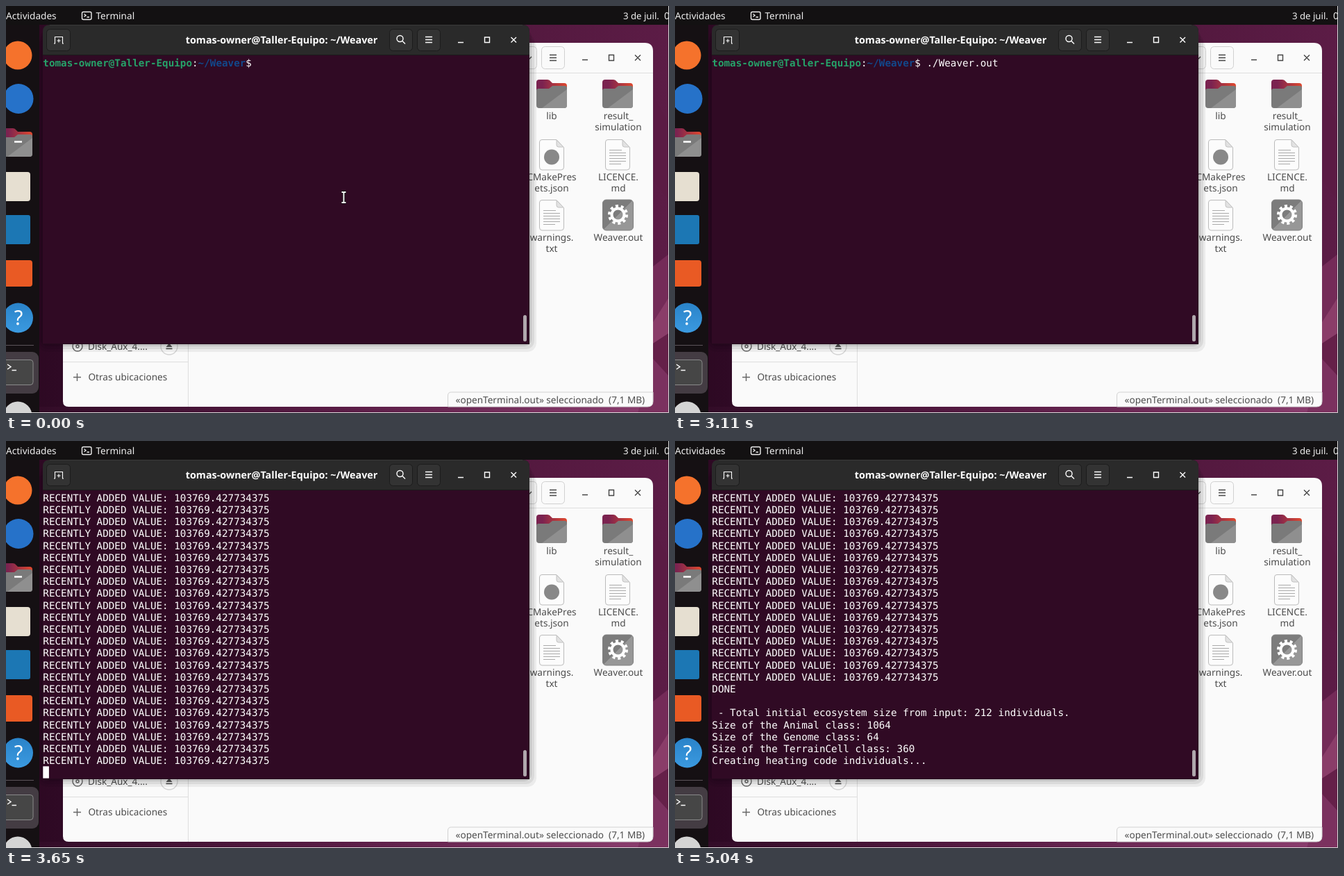
Animation, 955 px wide and 586 px high, one loop 5.41 s. Source, as an HTML page:

```html
<!DOCTYPE html>
<html lang="es">
<head>
<meta charset="utf-8">
<title>Terminal</title>
<style>
html, body { margin: 0; width: 100%; height: 100%; overflow: hidden; background: #300a24; }
svg { display: block; }
text { font: 13.6px "Noto Sans", sans-serif; text-rendering: geometricPrecision; white-space: pre; }
.mid { text-anchor: middle; }
.files text { fill: #4c4c4c; }
.title { font-weight: 700; font-size: 14.35px; fill: #fff; }
.mono, .mono text { font: 14.27px "DejaVu Sans Mono", monospace; fill: #fff; }
.mono .user { font-weight: 700; fill: #26a269; }
.mono .path { font-weight: 700; fill: #12488b; }
.line { fill: none; stroke-width: 1.4; }
</style>
</head>
<body>
<svg width="955" height="586" viewBox="0 0 955 586">
  <defs>
    <linearGradient id="wall">
      <stop offset="0" stop-color="#2b0820"/><stop offset=".1" stop-color="#300a26"/>
      <stop offset=".6" stop-color="#4d1639"/><stop offset="1" stop-color="#5c1c46"/>
    </linearGradient>
    <linearGradient id="floor">
      <stop offset="0" stop-color="#2e0a24"/><stop offset=".5" stop-color="#591c45"/>
      <stop offset="1" stop-color="#8d3f70"/>
    </linearGradient>
    <linearGradient id="back"><stop offset=".2" stop-color="#7b2350"/><stop offset="1" stop-color="#e0492f"/></linearGradient>
    <linearGradient id="gray" x1="0" y1="0" x2="1" y2="1">
      <stop offset=".5" stop-color="#7c7c7c"/><stop offset=".5" stop-color="#979797"/>
    </linearGradient>
    <linearGradient id="help" x1="0" y1="0" x2="0" y2="1"><stop offset="0" stop-color="#2a83c9"/><stop offset="1" stop-color="#3b9ae0"/></linearGradient>
    <symbol id="folder" overflow="visible">
      <path d="M0 36V4q0-4 4-4h12q3 0 5 3l2 2h17q4 0 4 4v27z" fill="url(#back)"/>
      <path d="M0 16q0-3 3-3h15l5-4h18q3 0 3 3v25q0 4-4 4H4q-4 0-4-4z" fill="#7a7a7a"/>
      <path d="M44 14v23q0 4-4 4H8z" fill="#8f8f8f"/>
    </symbol>
    <symbol id="page" overflow="visible">
      <path d="M4 .5h21l10.500 11V40q0 4-4 4H4q-3.500 0-3.500-4V4q0-3.500 3.500-3.500z" fill="#fcfcfc" stroke="#bbb"/>
      <path d="M25 1v7q0 3 3 3h7z" fill="#e2e2e2" stroke="#c2c2c2"/>
    </symbol>
    <symbol id="rules" overflow="visible">
      <path d="M6 15.500h18M6 19.500h24M6 23.500h24M6 27.500h24M6 31.500h24M6 35.500h17" stroke="#aaa"/>
    </symbol>
  </defs>

  <rect width="955" height="586" fill="url(#wall)"/>
  <rect y="577" width="955" height="9" fill="url(#floor)"/>
  <path d="M932 130l23 40v110l-23-30z" fill="#5b1b44"/>
  <path d="M932 375l23-18v62l-23 36z" fill="#742b58"/>
  <path d="M932 455l23-36v52l-23 15z" fill="#8a3d69"/>
  <path d="M932 486l23-15v62l-23-25z" fill="#652049"/>
  <path d="M932 508l23 25v53h-45z" fill="#7b315f"/>

  <!-- file manager -->
  <g class="files">
    <path d="M82 65q0-12 12-12h826q12 0 12 12v504q0 8-8 8H90q-8 0-8-8z" fill="#fafafa"/>
    <path d="M82 96.500h850M82 512.500h180M262.500 97v480" stroke="#dedede"/>
    <g fill="#fafafa" stroke="#d0d0d0">
      <rect x="730.500" y="58.500" width="34" height="32" rx="5"/>
      <rect x="771.500" y="58.500" width="33" height="32" rx="5"/>
    </g>
    <path class="line" stroke="#444" d="M751 73l3 3 3-3M783 70.500h10M783 74.500h10M783 78.500h10M830 77.500h8M868.500 70.500h7v8h-7zM906 70.500l8 8M914 70.500l-8 8"/>
    <use href="#folder" x="764" y="106"/>
    <use href="#folder" x="859" y="106"/>
    <use href="#page" x="768" y="192"/>
    <circle cx="786" cy="217.500" r="11" fill="#888"/>
    <use href="#page" x="863" y="192"/><use href="#rules" x="863" y="192"/>
    <use href="#page" x="768" y="279"/><use href="#rules" x="768" y="279"/>
    <rect x="859.500" y="279" width="44" height="44" rx="5" fill="url(#gray)" stroke="#808080"/>
    <circle cx="881.500" cy="300.500" r="9" fill="none" stroke="#fff" stroke-width="4"/>
    <circle cx="881.500" cy="300.500" r="12.500" fill="none" stroke="#fff" stroke-width="4" stroke-dasharray="4 3.854"/>
    <g class="mid">
      <text x="786" y="163">lib</text>
      <text x="882" y="163">result_</text><text x="882" y="179">simulation</text>
      <text x="786" y="251">CMakePres</text><text x="786" y="267">ets.json</text>
      <text x="882" y="251">LICENCE.</text><text x="882" y="267">md</text>
      <text x="786" y="338">warnings.</text><text x="786" y="354">txt</text>
      <text x="882" y="338">Weaver.out</text>
    </g>
    <g class="line" stroke="#666">
      <circle cx="103" cy="490" r="7"/><circle cx="103" cy="490" r="2"/>
      <circle cx="235" cy="490" r="12" stroke="#d4d4d4"/>
      <path d="M97 534.500h11M102.500 529v11"/>
    </g>
    <path d="M235 485.500l4.500 5.500h-9zM230.500 492.500h9v1.700h-9z" fill="#555"/>
    <text x="118" y="494.500">Disk_Aux_4....</text>
    <text x="118.500" y="539">Otras ubicaciones</text>
    <path d="M636.500 577v-16q0-5 5-5H932v13q0 8-8 8z" fill="#fafafa" stroke="#d2d2d2"/>
    <text x="647.500" y="571.500">«openTerminal.out» seleccionado<tspan dx="7">(7,1 MB)</tspan></text>
  </g>

  <!-- terminal shadow, in bands -->
  <g fill="#000">
    <rect x="46" y="46" width="718" height="452" rx="13" fill-opacity=".06"/>
    <rect x="48" y="40" width="713" height="454" rx="12" fill-opacity=".07"/>
    <rect x="50" y="34" width="707" height="456" rx="10" fill-opacity=".1"/>
  </g>

  <!-- dock and top bar -->
  <rect y="27" width="48" height="559" fill="#151013"/>
  <circle cx="17" cy="71" r="20.500" fill="#f5722c"/>
  <circle cx="18" cy="133.500" r="21.500" fill="#2672c9"/>
  <use href="#folder" x="-6" y="176"/>
  <path d="M12 195.500h11" stroke="#fff" stroke-width="2.500"/>
  <rect x="-7" y="239" width="42" height="42" rx="4" fill="#e6dfd1"/>
  <rect x="-7" y="301" width="42" height="42" rx="3" fill="#1c77b4"/>
  <rect x="-4" y="366" width="42" height="38" rx="4" fill="#e95a24"/>
  <circle cx="17.500" cy="449" r="21.500" fill="url(#help)"/>
  <text class="mid" x="18" y="459" style="font-size:29px" fill="#fff">?</text>
  <path d="M0 488.500h40" stroke="#5c535a"/>
  <rect x="-9" y="498" width="56" height="60" rx="9" fill="#443c43"/>
  <rect x="-5" y="509.500" width="44" height="36" rx="4" fill="#464646" stroke="#8a8a8a"/>
  <path class="line" d="M2 516l5 3.500-5 3.500M8.500 524.500h6.500" stroke="#fff"/>
  <circle cx="17" cy="590" r="20.500" fill="#d4d4d4"/>
  <rect width="955" height="27" fill="#131112"/>
  <g fill="#eee">
    <text x="0" y="18.800">Actividades</text>
    <text x="129.500" y="18.800">Terminal</text>
    <text x="889" y="18.800" style="font-size:13.200px">3 de juil.</text>
    <text x="948" y="18.800">09:41</text>
  </g>
  <g class="line" stroke="#eee">
    <rect x="109.500" y="8.500" width="13.500" height="11" rx="2"/>
    <path d="M112.500 11.500l2.500 2-2.500 2M116.500 16h3.500"/>
  </g>

  <!-- terminal -->
  <path d="M53 37q0-10 10-10h681q10 0 10 10v450H53z" fill="#300a24"/>
  <path d="M53 70V37q0-10 10-10h681q10 0 10 10v33z" fill="#2a2a2a"/>
  <path d="M53 70.500h701" stroke="#1b1b1b"/>
  <path d="M63 27.500h681" stroke="#3b3b3b"/>
  <path d="M753.500 70v417M53 486.500h701" stroke="#250a1d"/>
  <g fill="#333" stroke="#1c1c1c">
    <rect x="58.500" y="33.500" width="34" height="31" rx="5"/>
    <rect x="552.500" y="33.500" width="33" height="31" rx="5"/>
    <rect x="592.500" y="33.500" width="33" height="31" rx="5"/>
  </g>
  <g class="line" stroke="#fff">
    <path d="M69 54h1.500v-9.500h11V54H83M76 47.500v5M73.500 50h5" stroke-width="1.100"/>
    <circle cx="567.500" cy="47" r="4.500"/>
    <path d="M571 50.500l4 4M604 44.500h10M604 48.500h10M604 52.500h10M651 52.500h8M689.500 45h7v7.500h-7zM727.500 45l7.500 7.500M735 45l-7.500 7.500"/>
  </g>
  <text class="title mid" x="397" y="53.500">tomas-owner@Taller-Equipo: ~/Weaver</text>
  <rect x="745" y="445" width="5" height="38" rx="2.500" fill="#b0a8ad"/>
  <g class="mono">
    <text id="prompt" x="53.300" y="86.900"><tspan class="user">tomas-owner@Taller-Equipo</tspan>:<tspan class="path">~/Weaver</tspan>$</text>
    <g id="rows"></g>
    <rect id="caret" width="8.600" height="17.200" fill="#fff"/>
  </g>

  <g id="beam">
    <path d="M-3.500-7.500h2.500l1 1 1-1h2.500M0-6.500v13M-3.500 7.500h2.500l1-1 1 1h2.500" fill="none" stroke="#111" stroke-width="3.600"/>
    <path d="M-3-7.500h2l1 1 1-1h2M0-6.500v13M-3 7.500h2l1-1 1 1h2" fill="none" stroke="#fff" stroke-width="1.800"/>
  </g>
  <path id="arrow" d="M0 0v15l3.500-3 2.500 5.500 2.500-1-2.500-5.500h5z" fill="#111" stroke="#fff"/>
  <path d="M954.500 0v585.500H0" fill="none" stroke="#d8d8d8"/>
</svg>
<script>
const LOOP = 5410, ROW = 17.19, COL = 8.59, LEFT = 53.3, TOP = 73;
const $ = id => document.getElementById(id);
const pad = ' '.repeat(36), bar = '='.repeat(47), command = './Weaver.out ';

const startup = [
  pad + command,
  bar, 'Reading configuration and initializing world...', bar,
  '',
  'Reading all resource species from JSON files ...',
  ' - Resource scientific name: alternative',
  '',
  ' - Resource scientific name: ferns',
  '',
  'Reading all animal species from JSON files ...',
  "[WARNING] Item 'instarFirstReproduction' is not being used because 'indeterminat",
  "eGrowth' is disabled",
  "[WARNING] Item 'defaultOntogeneticValue.preference' is not being used because 'g",
  "lobalPreference' is defined",
  ' - Animal scientific name: Edmontosaurus_sp',
  'numberOfInstars: 20',
  ''
];
const values = n => Array(n).fill('RECENTLY ADDED VALUE: 103769.427734375');
const summary = [
  ...values(16),
  'DONE', '',
  ' - Total initial ecosystem size from input: 212 individuals.',
  'Size of the Animal class: 1064',
  'Size of the Genome class: 64',
  'Size of the TerrainCell class: 360',
  'Creating heating code individuals...',
  ''
];
const typed = n => [pad + command.slice(0, n)];
const begun = n => [...startup.slice(0, n), ''];

// start time, lines on screen, caret shown
const scenes = [
  [0, typed(0), 0], [430, typed(0), 1], [1020, typed(0), 0],
  [1140, typed(1), 1], [1570, typed(2), 1], [2160, typed(3), 1],
  [2310, typed(4), 1], [2520, typed(13), 1], [3110, typed(13), 0],
  [3330, begun(1), 1], [3390, begun(4), 1], [3460, begun(9), 1],
  [3530, startup, 1], [3650, [...values(23), ''], 1],
  [3680, summary, 1], [3920, summary, 0], [4490, summary, 1], [5040, summary, 0]
];

const rows = Array.from({ length: 24 }, (_, i) => {
  const row = document.createElementNS('http://www.w3.org/2000/svg', 'text');
  row.setAttribute('x', LEFT);
  row.setAttribute('y', TOP + 13.9 + i * ROW);
  return $('rows').appendChild(row);
});

const show = (el, on) => el.setAttribute('visibility', on ? 'visible' : 'hidden');
const place = (el, x, y) => el.setAttribute('transform', `translate(${x} ${y})`);

let current;
function drawScene(scene) {
  if (scene === current) return;
  current = scene;
  const [, lines, caret] = scene;
  rows.forEach((row, i) => row.textContent = lines[i] || '');
  show($('prompt'), lines[0].startsWith(pad));
  show($('caret'), caret);
  const last = lines.length - 1;
  place($('caret'), LEFT + lines[last].length * COL, TOP + last * ROW);
}

function drawPointer(t) {
  const p = Math.min(Math.max((t - 4460) / 270, 0), 1);
  const ease = p * p * (3 - 2 * p);
  const x = 486.5 + 367 * ease, y = 275.5 + 311 * ease;
  const seen = t < 1140 || (t >= 4260 && t < 4730);
  const inside = x < 754 && y < 487;
  show($('beam'), seen && inside);
  show($('arrow'), seen && !inside);
  place($('beam'), x, y);
  place($('arrow'), x, y);
}

const start = performance.now();
function frame() {
  const t = (performance.now() - start) % LOOP;
  drawScene(scenes.findLast(s => s[0] <= t));
  drawPointer(t);
  requestAnimationFrame(frame);
}
frame();
</script>
</body>
</html>
```
